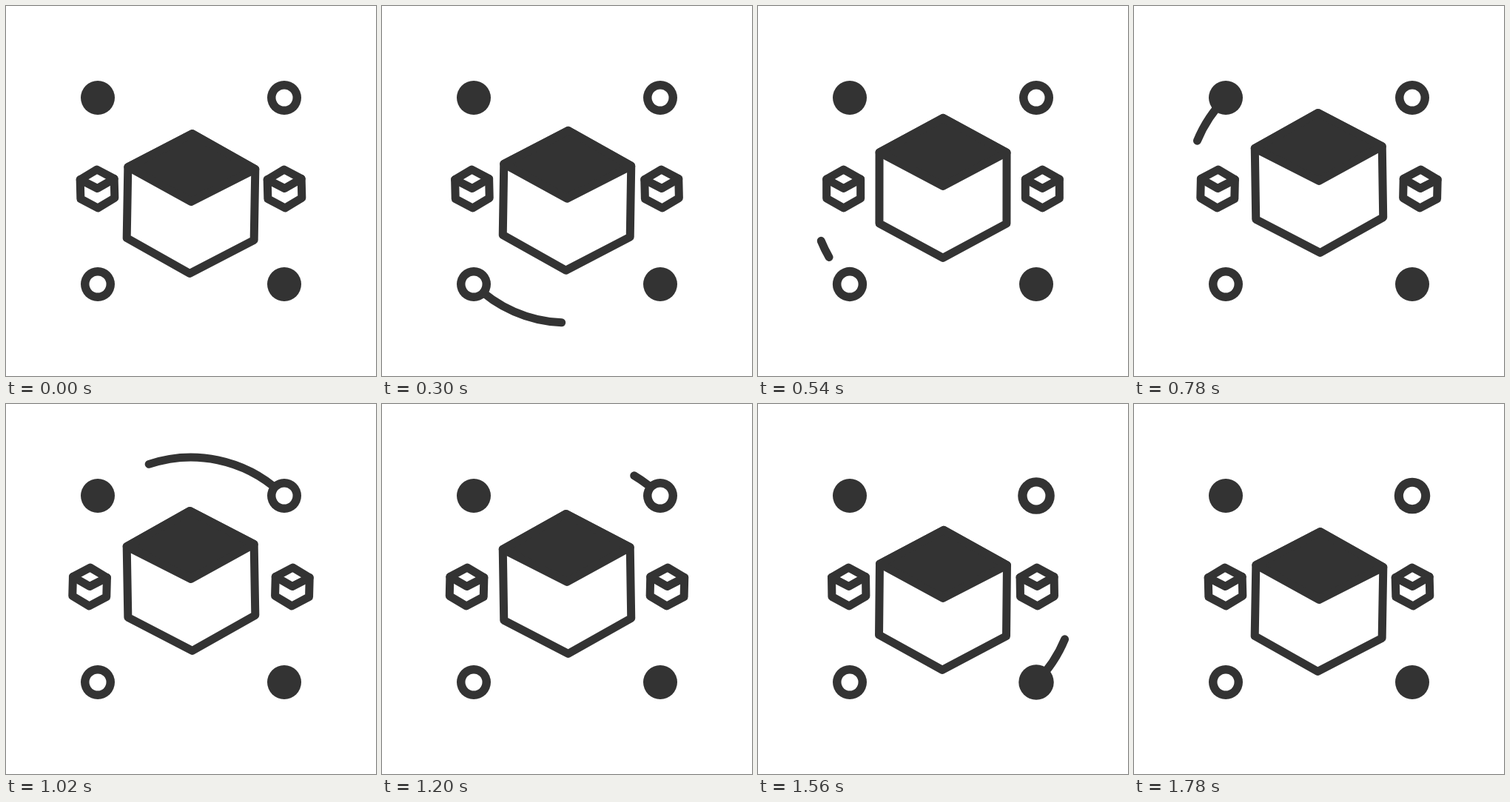
An HTML page with a canvas that plays this animation: 500 by 500 pixels, repeating every 1.8 s.

```html
<!DOCTYPE html>
<html>
<head>
<meta charset="utf-8">
<style>
html, body { margin: 0; height: 100%; overflow: hidden; background: #fff; }
canvas { display: block; width: 500px; height: 500px; }
</style>
</head>
<body>
<canvas id="stage" width="500" height="500"></canvas>
<script>
const ctx = document.getElementById('stage').getContext('2d');
const LOOP = 1800, INK = '#333', LINE = 11, RADIUS = 178;

const clamp = x => Math.min(1, Math.max(0, x));
const cubic = x => x < .5 ? 4 * x ** 3 : 1 - 4 * (1 - x) ** 3;
const smooth = x => x * x * (3 - 2 * x);

// There and back once per loop, 0 -> 1 -> 0
function swing(t) {
  const p = ((t + LOOP) % LOOP) / (LOOP / 2);
  return cubic(p < 1 ? p : 2 - p);
}

// Rises over [a, b] and falls over [b, c]
const bump = (t, a, b, c) => smooth(clamp((t - a) / (b - a))) * (1 - smooth(clamp((t - b) / (c - b))));

function poly(points, closed, fill) {
  ctx.beginPath();
  points.forEach(([x, y]) => ctx.lineTo(x, y));
  if (closed) ctx.closePath();
  if (fill) ctx.fill();
  ctx.stroke();
}

function cube(x, y, angle, w, h, side, mid, filled) {
  ctx.save();
  ctx.translate(x, y);
  ctx.rotate(angle * Math.PI / 180);
  poly([[0, -h], [w, -side], [w, side], [0, h], [-w, side], [-w, -side]], true);
  if (filled) poly([[0, -h], [w, -side], [0, mid], [-w, -side]], true, true);
  else poly([[-w, -side], [0, mid], [w, -side]]);
  ctx.restore();
}

function dot(x, y, grow, ring) {
  const scale = 1 + .087 * grow;
  const disc = (r, color) => {
    ctx.fillStyle = color;
    ctx.beginPath();
    ctx.arc(x, y, r * scale, 0, 7);
    ctx.fill();
  };
  disc(23, INK);
  if (ring) disc(11.5, '#fff');
}

// Quarter arc running clockwise from one dot into the next
function trail(index, t) {
  const gap = .165;
  const head = gap + (1 - gap) * smooth(clamp((t - 108) / 139));
  const tail = gap + (1 - gap) * (1 - (1 - clamp((t - 195) / 300)) ** 1.3);
  if (head <= gap || tail >= .96) return;
  const angle = p => (index + .5 + p) * Math.PI / 2;
  ctx.beginPath();
  ctx.arc(250, 250, RADIUS, angle(tail), angle(head));
  ctx.stroke();
}

function draw(t) {
  ctx.fillStyle = '#fff';
  ctx.fillRect(0, 0, 500, 500);
  ctx.strokeStyle = INK;
  ctx.lineWidth = LINE;
  ctx.lineCap = ctx.lineJoin = 'round';

  [0, 405, 790, 1185].forEach((start, i) => trail(i, t - start));

  dot(124, 376, bump(t, 330, 440, 560), true);
  dot(124, 124, bump(t, 780, 880, 1000));
  dot(376, 124, bump(t, 1200, 1370, 1370 + 1000), true);
  dot(376, 376, bump(t, 1520, 1620, 1740));

  const lift = swing(t), tilt = 1 - 2 * swing(t - 100);
  ctx.fillStyle = INK;
  cube(250, 267 - 28.3 * lift, tilt, 86, 94.5, 48, -2.5, true);
  const shift = 10.5 * lift;
  cube(123.5 - shift, 247, -1.5 * tilt, 23, 26, 13, -.5);
  cube(376.5 + shift, 247, -1.5 * tilt, 23, 26, 13, -.5);
}

const begin = performance.now();
function tick() {
  draw((performance.now() - begin) % LOOP);
  requestAnimationFrame(tick);
}
tick();
</script>
</body>
</html>
```
